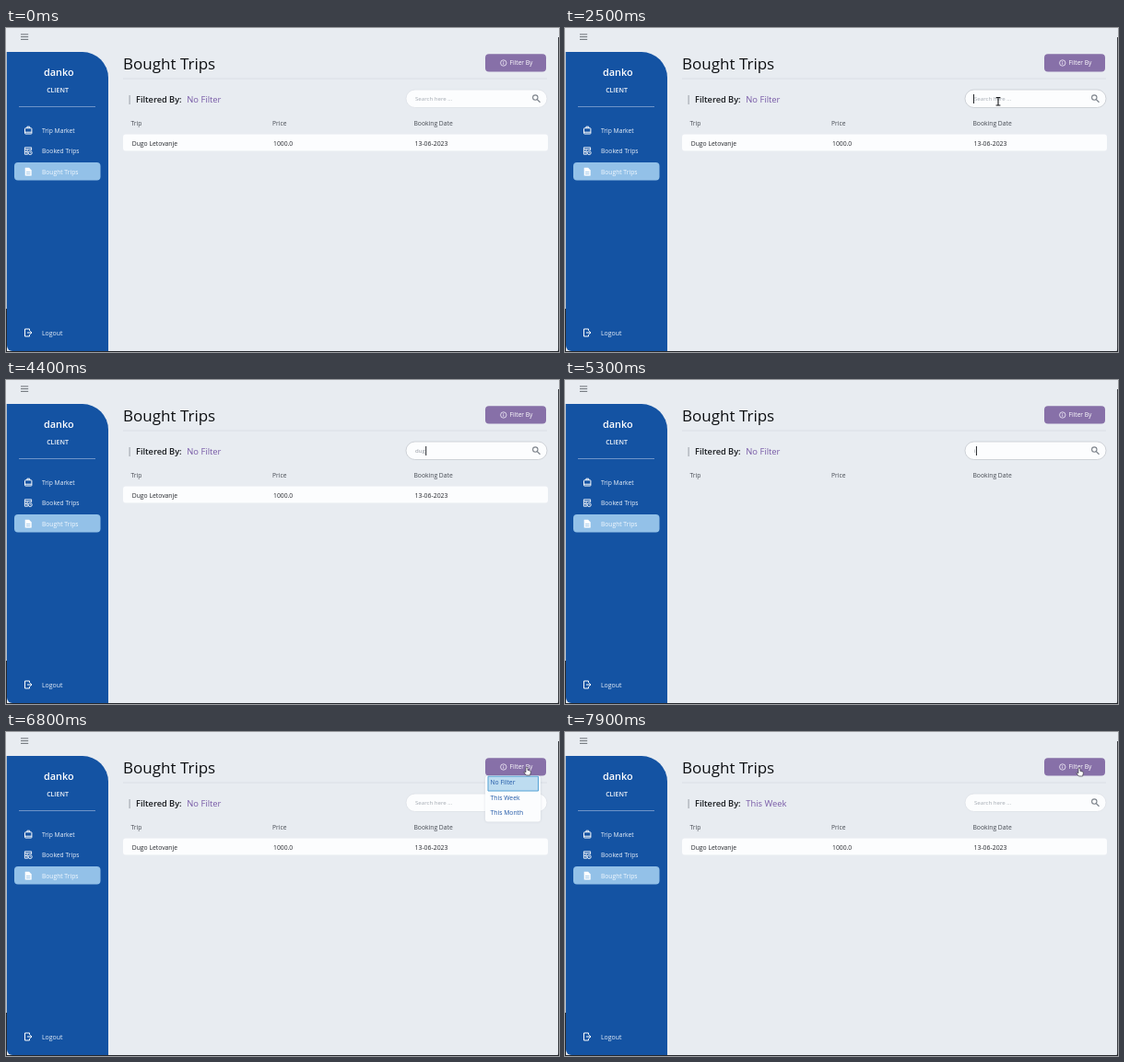
Animation, 600 px wide and 352 px high, one loop 8 s. Source, as an HTML page with a canvas:

```html
<!DOCTYPE html>
<html lang="en">
<head>
<meta charset="utf-8">
<title>Bought Trips</title>
<style>
html, body { margin: 0; width: 100%; height: 100%; overflow: hidden; background: #e8ecf1; }
canvas { display: block; width: 600px; height: 352px; }
</style>
</head>
<body>
<canvas id="stage"></canvas>
<script>
const W = 600, H = 352, LOOP = 8000, STEP = 100;
const canvas = document.getElementById('stage');
const ctx = canvas.getContext('2d');
const ratio = window.devicePixelRatio || 1;
canvas.width = W * ratio;
canvas.height = H * ratio;

const FONT = '"Open Sans", "Noto Sans", sans-serif';
const BLUE = '#1453a3', VIOLET = '#8770a8', PAGE = '#e8ecf1';
const MENU = ['No Filter', 'This Week', 'This Month'];

// Pointer stops: time, x, y
const APPROACH = [[800, 560, 190], [1200, 457, 93], [1600, 457, 93], [2100, 470, 79], [3500, 470, 79]];
const PICK = [[6000, 470, 79], [6400, 562, 40], [6800, 565, 38], [7000, 552, 58], [7200, 545, 71],
  [7400, 545, 71], [7700, 561, 42], [7800, 558, 39], [7900, 558, 39]];

// Search entry: start time, value
const TYPED = [[0, ''], [3600, 'd'], [3900, 'du'], [4200, 'dug'], [4900, 'du'], [5000, 'd'],
  [5100, ''], [5200, 'i'], [5600, '']];

const between = (t, a, b) => t >= a && t < b;
const lastAt = (list, t) => list.filter(k => k[0] <= t).pop()[1];

function follow(path, t) {
  const i = path.findIndex(p => p[0] >= t);
  if (i < 1) return path[i < 0 ? path.length - 1 : 0].slice(1);
  const [t0, x0, y0] = path[i - 1], [t1, x1, y1] = path[i];
  const k = (t - t0) / (t1 - t0), e = k * k * (3 - 2 * k);
  return [x0 + (x1 - x0) * e, y0 + (y1 - y0) * e];
}

function text(str, x, y, size, color, weight = 400, align = 'left') {
  ctx.font = `${weight} ${size}px ${FONT}`;
  ctx.textAlign = align;
  ctx.fillStyle = color;
  ctx.fillText(str, x, y);
}

function rect(x, y, w, h, color) {
  ctx.fillStyle = color;
  ctx.fillRect(x, y, w, h);
}

function box(x, y, w, h, r, fill, stroke, line = 1) {
  ctx.beginPath();
  ctx.roundRect(x, y, w, h, r);
  if (fill) { ctx.fillStyle = fill; ctx.fill(); }
  if (stroke) { ctx.strokeStyle = stroke; ctx.lineWidth = line; ctx.stroke(); }
}

function ring(x, y, r, color, line) {
  ctx.beginPath();
  ctx.arc(x, y, r, 0, Math.PI * 2);
  ctx.strokeStyle = color;
  ctx.lineWidth = line;
  ctx.stroke();
}

function path(d, x, y, fill, stroke, line = 1) {
  const shape = new Path2D(d);
  ctx.save();
  ctx.translate(x, y);
  if (fill) { ctx.fillStyle = fill; ctx.fill(shape); }
  if (stroke) { ctx.strokeStyle = stroke; ctx.lineWidth = line; ctx.stroke(shape); }
  ctx.restore();
}

function sidebar() {
  box(1, 26, 110, 325, [0, 28, 0, 6], BLUE);
  text('danko', 57.3, 52, 10.9, '#fff', 600, 'center');
  text('CLIENT', 56, 69.6, 7, '#f2f6fb', 600, 'center');
  rect(14, 85, 83, 1, '#6f94c8');
  box(9, 146, 93.5, 19.5, 4, '#93c1e8');
  text('Trip Market', 39, 113.6, 6.7, '#eaf1fa');
  text('Booked Trips', 39, 136, 6.7, '#eaf1fa');
  text('Bought Trips', 39, 158.6, 6.7, '#f4f9fe');
  text('Logout', 39, 333.6, 6.9, '#eaf1fa');

  // Briefcase
  box(20.5, 108.8, 7.4, 6.2, 0.6, null, '#fff');
  path('M2.4 0V-1.6H5.2V0M0 4.4H7.4', 20.5, 108.8, null, '#fff');
  // Calendar with clock
  path('M3.4 7.4H0V0H7.2V3M0 2H7.2M0 4.6H3M2.6 2V7', 20.4, 129.8, null, '#fff', 0.9);
  ring(26.2, 135.6, 2, '#fff', 0.9);
  path('M0 -1V0.2H0.9', 26.2, 135.5, null, '#fff', 0.6);
  // Document
  path('M0 0H4.4L7 2.6V8.6H0Z', 20.7, 151.8, '#fff');
  rect(22, 156, 4.4, 0.8, '#93c1e8');
  rect(22, 158, 4.4, 0.8, '#93c1e8');
  // Exit
  path('M5 1.8V0H0V8H5V6.2M2.4 4H7.4M5.6 2.2L7.4 4L5.6 5.8', 20.5, 327, null, '#fff');
}

function table(showRow) {
  text('Trip', 135.5, 105.8, 6.7, '#454a52');
  text('Price', 289, 105.8, 6.7, '#454a52');
  text('Booking Date', 442.5, 105.8, 6.75, '#454a52');
  if (!showRow) return;
  box(127, 115.5, 461, 18, 3, '#fcfdfe');
  text('Dugo Letovanje', 136.7, 127.5, 6.8, '#25282d');
  text('1000.0', 290, 127.5, 6.8, '#25282d');
  text('13-06-2023', 443.5, 127.5, 6.9, '#25282d');
}

function search(t, value) {
  const focused = between(t, 2100, 6400);
  box(434, 67, 153, 19.5, 9.75, '#fcfdfe', focused ? '#c6cad0' : '#dde1e7', 0.8);
  text(value || 'Search here ...', 444, 79.4, 6.1, value ? '#8f959d' : '#a4aab2');
  ring(574.3, 75.6, 2.7, '#7d838b', 1.1);
  path('M0 0L3.2 3.2', 576.3, 77.6, null, '#7d838b', 1.3);
  if (!focused) return;
  const pressed = TYPED.filter(k => k[0] <= t).pop()[0] || 2100;
  if (Math.floor((t - pressed) / 500) % 2) return;
  ctx.font = `400 6.1px ${FONT}`;
  const x = value ? 444.4 + ctx.measureText(value).width : 443;
  rect(x, 72, 1, 10, '#24272b');
}

function menu() {
  ctx.save();
  ctx.shadowColor = 'rgba(40,50,70,0.12)';
  ctx.shadowBlur = 3 * ratio;
  box(520, 47.5, 60, 50, 3, '#fcfdfe');
  ctx.restore();
  box(523, 48.2, 54.5, 15.8, 0, '#bddcf0', '#56a3d6', 1);
  MENU.forEach((label, i) => text(label, 525.5, 57.2 + i * 16.4, 6.8, '#1f57a6'));
}

function header(filter) {
  [6.5, 9.2, 11.9].forEach(y => rect(16, y, 8.2, 0.9, '#5c6168'));
  text('Bought Trips', 127, 45, 17, '#0c0e11', 500);
  rect(127, 54.6, 460, 0.8, '#d5dae1');
  box(520, 28.2, 66, 19.3, 4, VIOLET);
  ring(539.8, 38, 3.2, '#f4f0fa', 0.8);
  rect(539.4, 37.4, 0.8, 2.3, '#f4f0fa');
  rect(539.4, 36, 0.8, 0.8, '#f4f0fa');
  text('Filter By', 546.5, 40.4, 6.65, '#fff');
  rect(133.6, 73, 1, 10, '#9a9fa7');
  text('Filtered By:', 141, 81, 9.2, '#15181c', 600);
  text(filter, 196.3, 81, 9.4, '#7759a6', 500);
}

function pointer(t) {
  const route = between(t, 800, 3600) ? APPROACH : t >= 6000 ? PICK : null;
  if (!route) return;
  const [x, y] = follow(route, t);
  const overField = x > 434 && x < 587 && y > 67 && y < 87;
  const overMenu = between(t, 6400, 7300) && x > 520 && x < 580 && y > 47 && y < 97;
  const overButton = x > 520 && x < 586 && y > 28 && y < 48;
  if (overMenu || overButton) {
    path('M-1 0.7Q0 -0.8 1 0.7V3.4L4 4.2Q4.6 4.5 4.4 5.6L3.6 9H-0.6L-3.2 5.6Q-2.6 4.6 -1 5.8Z',
      x, y, '#fff', '#3c3c44', 0.7);
  } else if (overField) {
    path('M-2.4 -4H-0.5L0 -3.6L0.5 -4H2.4M0 -3.6V4M-2.4 4.4H-0.5L0 4L0.5 4.4H2.4',
      x, y + 0.6, null, '#16181b', 1.1);
  } else {
    path('M0 0V8.6L2 6.8L3.3 9.8L4.7 9.2L3.4 6.2H6.1Z', x, y, '#fff', '#50545b', 0.7);
  }
}

function edges() {
  rect(0, 26, 1, 279, '#b9c1cc');
  rect(0, 305, 1, 47, '#25282d');
  rect(599, 10, 1, 342, '#3b3e43');
  rect(0, 351, 600, 1, '#25282d');
  path('M0 0V-5Q0 0 -5 0Z', 600, 352, '#25282d');
}

function draw(now) {
  const t = Math.floor((now % LOOP) / STEP) * STEP;
  const value = lastAt(TYPED, t);
  ctx.setTransform(ratio, 0, 0, ratio, 0, 0);
  rect(0, 0, W, H, PAGE);
  sidebar();
  header(t < 7300 ? MENU[0] : MENU[1]);
  table(!between(t, 5300, 5600));
  search(t, value);
  if (between(t, 6400, 7300)) menu();
  edges();
  pointer(t);
}

let start;
function tick(now) {
  if (start === undefined) start = now;
  draw(Math.max(0, now - start));
  requestAnimationFrame(tick);
}
draw(0);
requestAnimationFrame(tick);
</script>
</body>
</html>
```
